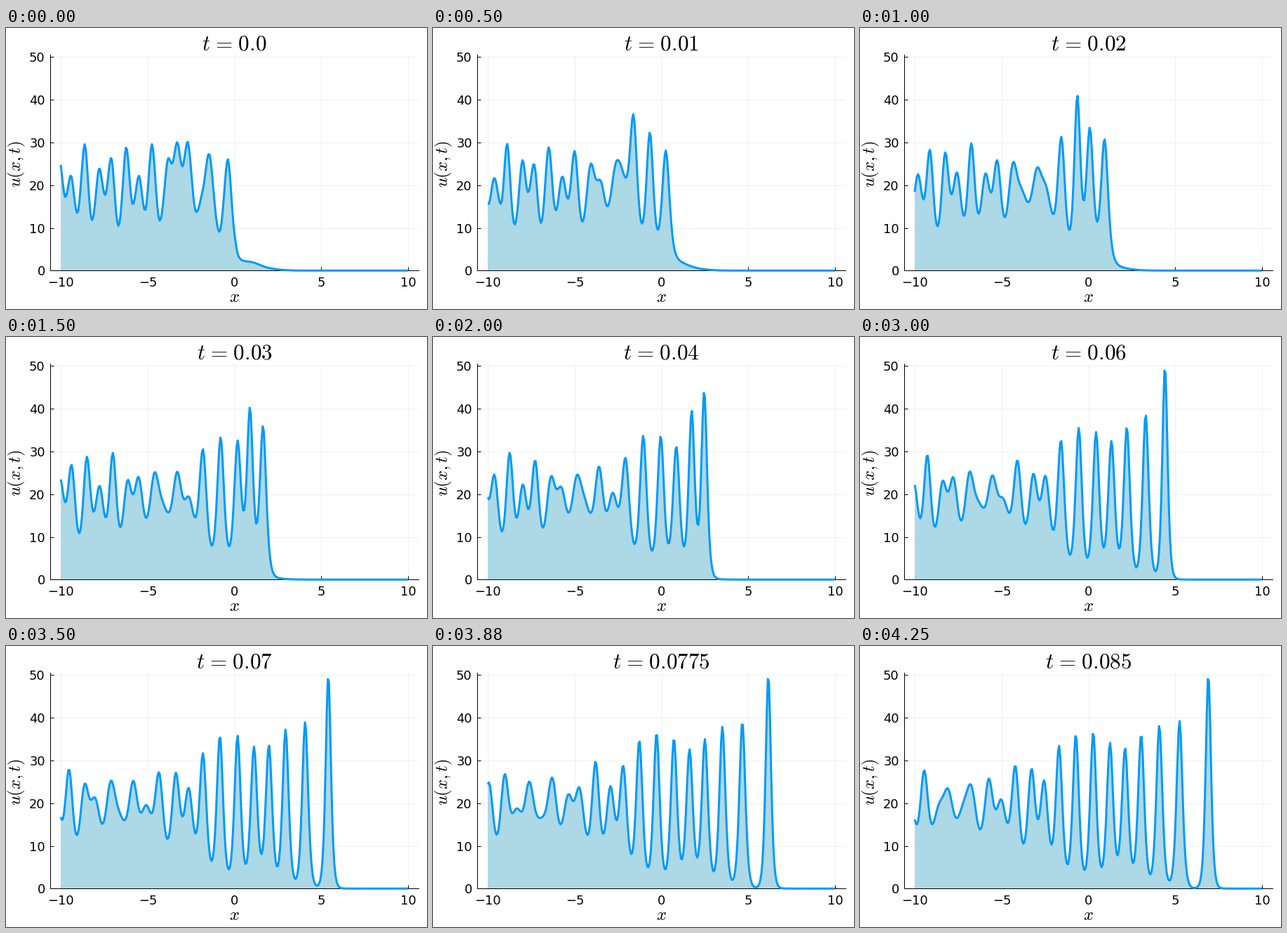
Recreate the animation shown at these times as a matplotlib script. Size 600 by 400 pixels, loop 4370 ms.

```python
import numpy as np
import matplotlib.pyplot as plt
from matplotlib.animation import FuncAnimation
from matplotlib.transforms import Bbox

W, H, DPI = 600, 400, 100
LOOP_MS, FRAMES = 4370, 35
DT_FRAME = 0.0025          # physical time per animation frame
SUBSTEPS = 40

# Periodic spectral grid, wider than the visible range
N, LENGTH = 1024, 64.0
grid = -52 + LENGTH / N * np.arange(N)
k = 2 * np.pi * np.fft.rfftfreq(N, LENGTH / N)
shown = (grid >= -10) & (grid <= 10)
x = grid[shown]

# Key points (x, u) of the wave at t = 0: crests, troughs and the right tail
START = np.array([
    (-10.1, 26.6), (-9.73, 17.2), (-9.42, 22.3), (-9.05, 13.5),
    (-8.62, 29.6), (-8.2, 11.8), (-7.78, 24), (-7.45, 17.7),
    (-7.1, 26.5), (-6.68, 10.5), (-6.23, 28.9), (-5.85, 15.5),
    (-5.5, 22.2), (-5.15, 14.1), (-4.75, 29.6), (-4.3, 11.7),
    (-3.8, 26.4), (-3.6, 25), (-3.3, 30.1), (-3, 24.4),
    (-2.7, 30.2), (-2.2, 13.7), (-1.82, 19), (-1.47, 27.4),
    (-0.87, 9.1), (-0.38, 26.1), (0, 8.6), (0.25, 3.2),
    (0.5, 2.3), (1, 2), (2, 0.6), (3, 0.1), (4.2, 0)])


def monotone_cubic(px, py, at):
    """Cubic through the points that does not overshoot them."""
    h = np.diff(px)
    d = np.diff(py) / h
    same = d[:-1] * d[1:] > 0
    total = np.where(same, d[:-1] + d[1:], 1)
    m = np.zeros_like(px)
    m[1:-1] = np.where(same, 2 * d[:-1] * d[1:] / total, 0)
    i = np.clip(np.searchsorted(px, at) - 1, 0, len(px) - 2)
    s = np.clip((at - px[i]) / h[i], 0, 1)
    rise = s * s * (3 - 2 * s)
    return (py[i] * (1 - rise) + py[i + 1] * rise
            + h[i] * s * (1 - s) * (m[i] * (1 - s) - m[i + 1] * s))


def two_tone(root):
    """Continue the wave to the left as a beat of the two best wavenumbers."""
    window = (grid > -10) & (grid < -4.4)

    def basis(at, k1, k2):
        waves = [f(q * (at + 7)) for q in (k1, k2, k2 - k1)
                 for f in (np.cos, np.sin)]
        return np.column_stack([np.ones_like(at)] + waves)

    best = np.inf
    for k1 in np.arange(4, 7.2, 0.06):
        for k2 in np.arange(7.2, 9.5, 0.06):
            b = basis(grid[window], k1, k2)
            c = np.linalg.lstsq(b, root[window], rcond=None)[0]
            error = np.sum((b @ c - root[window]) ** 2)
            if error < best:
                best, fit = error, (k1, k2, c)
    return basis(grid, *fit[:2]) @ fit[2]


def initial_wave():
    # The square root is close to sinusoidal between crest and trough
    root = monotone_cubic(START[:, 0], np.sqrt(START[:, 1]), grid)
    inside = 0.5 * (1 + np.tanh((grid + 10.1) / 0.1))
    root = inside * root + (1 - inside) * two_tone(root)
    return root ** 2 * 0.5 * (1 + np.tanh(grid + 25))


def evolve(u):
    """Integrate u_t + 6 u u_x + u_xxx = 0, returning one state per frame."""
    dt = DT_FRAME / SUBSTEPS
    dealias = k < 2 / 3 * k[-1]
    half = np.exp(0.5j * dt * k ** 3)
    full = half ** 2
    gain = -3j * dt * k * dealias
    sponge = 1 - 0.2 * np.exp(-((grid + 47) / 3) ** 2)

    def flux(w):
        return gain * np.fft.rfft(np.fft.irfft(w, N) ** 2)

    states = [u]
    v = np.fft.rfft(u) * dealias
    for _ in range(FRAMES - 1):
        for _ in range(SUBSTEPS):
            a = flux(v)
            b = flux(half * (v + a / 2))
            c = flux(half * v + b / 2)
            d = flux(full * v + half * c)
            v = full * v + (full * a + 2 * half * (b + c) + d) / 6
            v = np.fft.rfft(sponge * np.fft.irfft(v, N)) * dealias
        states.append(np.fft.irfft(v, N))
    return [np.maximum(s[shown], 0) for s in states]


waves = evolve(initial_wave())

plt.rcParams.update({"font.family": "DejaVu Sans", "mathtext.fontset": "cm"})
PX = 72 / DPI              # points per pixel
LEFT, RIGHT, TOP, BOTTOM = 63.2, 588, 38.2, 345.3

fig = plt.figure(figsize=(W / DPI, H / DPI), dpi=DPI, facecolor="white")
ax = fig.add_axes([LEFT / W, 1 - BOTTOM / H,
                   (RIGHT - LEFT) / W, (BOTTOM - TOP) / H])
ax.set_xlim(-10.6, 10.6)
ax.set_ylim(0, 50.54)
ax.set_xticks(range(-10, 11, 5))
ax.set_yticks(range(0, 51, 10))
ax.set_axisbelow(True)
ax.grid(color="#ededed", linewidth=0.8 * PX)
ax.tick_params(direction="in", length=5 * PX, width=PX, labelsize=17.9 * PX)
ax.tick_params(axis="x", pad=8.7 * PX)
ax.tick_params(axis="y", pad=7.4 * PX)
for side, spine in ax.spines.items():
    spine.set(visible=side in ("left", "bottom"), linewidth=PX, zorder=2.5)


def label(px, py, text, size, **kw):
    return fig.text(px / W, 1 - py / H, text, fontsize=size * PX,
                    ha="center", va="baseline", **kw)


title = label(325.5, 31.3, "", 31.2)
label(325, 389.5, "$x$", 24.4)
label(21, 193.5, "$u(x,t)$", 24.4, rotation=90, rotation_mode="anchor")

area, = ax.fill([-10, 10], [0, 0], color="lightblue", linewidth=0, zorder=2)
line, = ax.plot([], [], color="#009afa", linewidth=3 * PX, zorder=3,
                solid_capstyle="butt")
# The curve may overlap the bottom axis but is cut at the top
line.set_clip_box(Bbox.from_extents(LEFT, H - BOTTOM - 4, RIGHT, H - TOP))


def draw(i):
    u = waves[i]
    line.set_data(x, u)
    area.set_xy(np.column_stack([np.r_[-10, x, 10], np.r_[0, u, 0]]))
    t = round(i * DT_FRAME, 4)
    title.set_text(rf"$t\hspace{{0.1}}=\hspace{{0.1}}{t}$")
    return line, area, title


anim = FuncAnimation(fig, draw, frames=FRAMES, interval=LOOP_MS / FRAMES,
                     repeat=True, repeat_delay=0)
plt.show()
```
